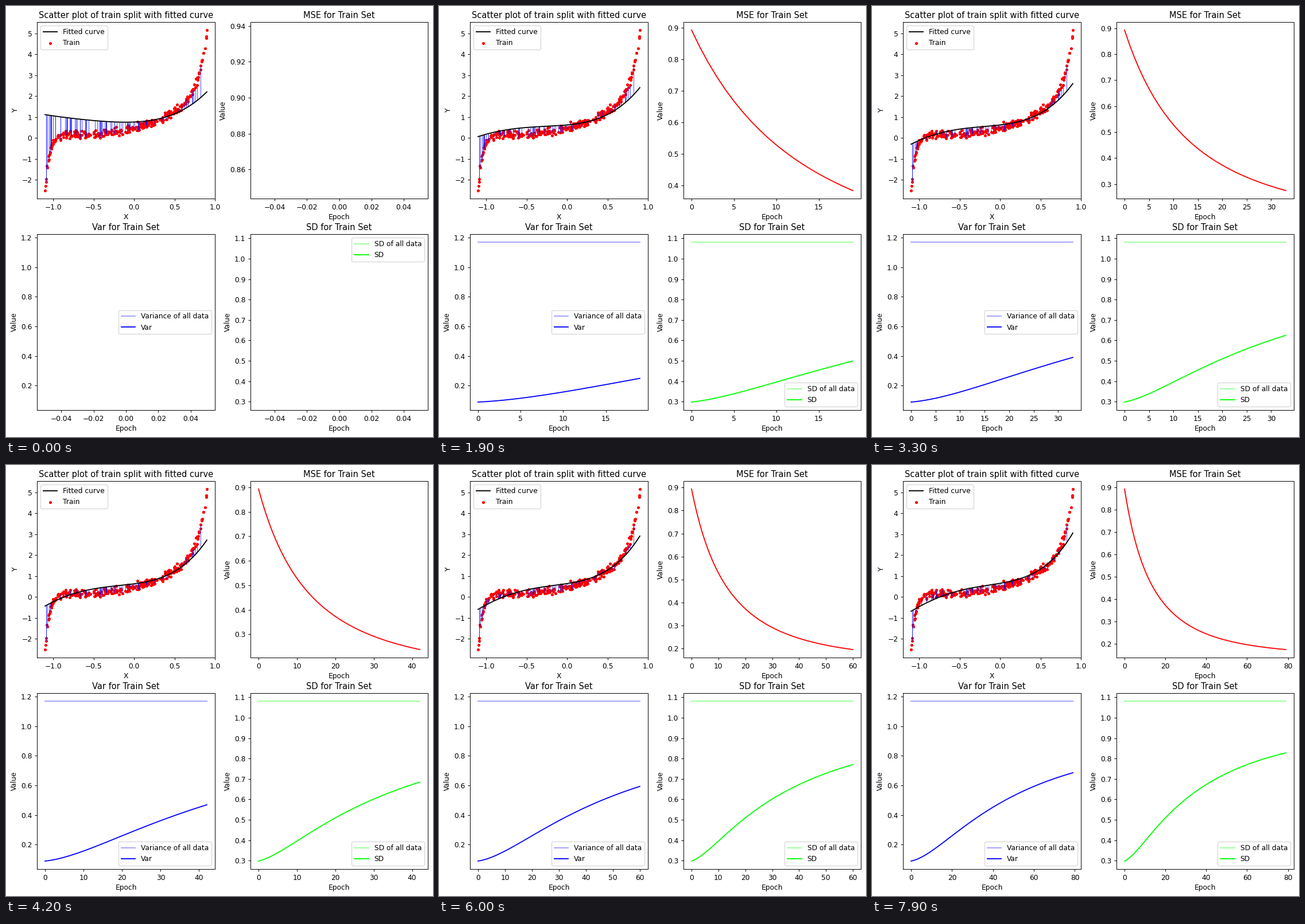
A matplotlib script that plays this animation: 744 px wide and 752 px high, repeating every 8000 ms.

```python
import numpy as np
import matplotlib.pyplot as plt
from matplotlib.animation import FuncAnimation

W, H, DPI, FRAMES = 744, 752, 88, 80
epochs = np.arange(FRAMES)
rng = np.random.default_rng(7)


def decays(t):
    """A constant and three exponential decays at the epochs t."""
    return np.exp(-np.outer(t, [0, 1 / 6, 1 / 16, 1 / 45]))


def relax(*states):
    """Sum of decays passing through four states, for every epoch."""
    return decays(epochs) @ np.linalg.solve(decays([0, 11, 33, 79]), np.array(states))


# Training history
mse = relax(.893, .507, .275, .174)
sd = relax(.298, .408, .625, .828)
var_all = 1.17

# Quartic model, highest power first
weights = relax([.21, .62, .87, .165, .76],
                [.25, .86, .73, .31, .64],
                [.255, 1.185, .656, .464, .62],
                [.463, 1.46, .544, .664, .65])


def trend(x):
    """Gentle parabola with a steep tail at each end."""
    return (.48 + .95 * x + .75 * x ** 2
            + 3.1 * np.exp((x - .9) / .12) - 2.85 * np.exp(-(x + 1.1) / .057))


x = np.r_[-1.1, rng.uniform(-1.1, .9, 300), .904]
y = trend(x) + rng.normal(0, .11, x.size).clip(-.25, .25)
y[[0, -1]] = trend(x[[0, -1]])
link_x, link_y = x[1:-1:3], y[1:-1:3]

fig = plt.figure(figsize=(W / DPI, H / DPI), dpi=DPI)


def panel(cols, rows, title, xlabel="Epoch", ylabel="Value"):
    (left, right), (top, bottom) = cols, rows
    ax = fig.add_axes([left / W, 1 - bottom / H, (right - left) / W, (bottom - top) / H])
    ax.set(title=title, xlabel=xlabel, ylabel=ylabel)
    return ax


col1, col2 = (54, 364), (426, 735)
row1, row2 = (28, 336), (398, 705)
ax_fit = panel(col1, row1, "Scatter plot of train split with fitted curve", "X", "Y")
ax_mse = panel(col2, row1, "MSE for Train Set")
ax_var = panel(col1, row2, "Var for Train Set")
ax_sd = panel(col2, row2, "SD for Train Set")

curve_x = np.linspace(-1.1, .9, 200)
curve, = ax_fit.plot([], [], "k", label="Fitted curve", zorder=3)
ax_fit.scatter(x, y, s=10, c="red", label="Train", zorder=1)
links = ax_fit.vlines(link_x, link_y, link_y, colors="blue", lw=.8, alpha=.7, zorder=1.5)
ax_fit.set(xlim=(-1.2, 1), ylim=(-2.904, 5.544))
ax_fit.legend(loc="upper left")

histories = []


def track(ax, values, color, **style):
    line, = ax.plot([], [], color=color, **style)
    histories.append((line, values))


track(ax_mse, mse, "red")
track(ax_var, np.full(FRAMES, var_all), "blue", alpha=.38, label="Variance of all data")
track(ax_var, sd ** 2, "blue", label="Var")
track(ax_sd, np.full(FRAMES, var_all ** .5), "lime", alpha=.4, label="SD of all data")
track(ax_sd, sd, "lime", label="SD")
for ax in (ax_var, ax_sd):
    ax.legend(loc="best")


def update(i):
    curve.set_data(curve_x, np.polyval(weights[i], curve_x))
    ends = np.polyval(weights[i], link_x)
    links.set_segments([[(a, b), (a, c)] for a, b, c in zip(link_x, link_y, ends)])
    for line, values in histories:
        line.set_data(epochs[:i + 1], values[:i + 1])
    for ax in (ax_mse, ax_var, ax_sd):
        ax.relim()
        ax.autoscale_view()


anim = FuncAnimation(fig, update, frames=FRAMES, interval=100, repeat=True, repeat_delay=0)
plt.show()
```
